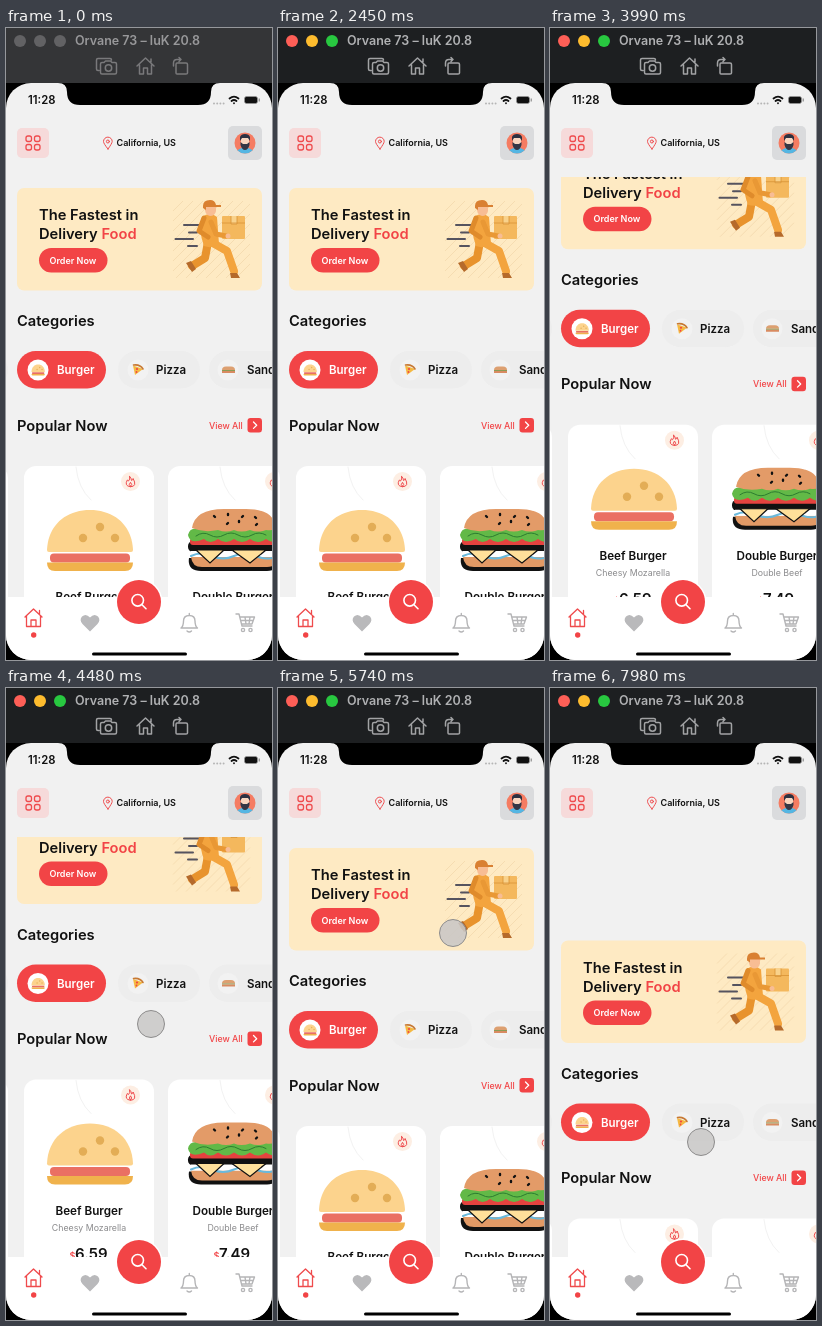
An HTML page that plays this animation: 266x632 px, repeating every 8 s.

```html
<!DOCTYPE html>
<html lang="en">
<head>
<meta charset="utf-8">
<title>Food delivery app</title>
<style>
  html, body { margin: 0; width: 100%; height: 100%; overflow: hidden; background: #000; }
  svg { display: block; width: 100%; height: 100%; }
  text { font-family: Inter, Roboto, sans-serif; font-weight: 600; fill: #111; }
  .head { font-size: 14.7px; }
  .chip { font-size: 11.5px; }
  .small { font-size: 9px; }
  .name { font-size: 11.7px; text-anchor: middle; }
  .sub { font-size: 8.8px; font-weight: 400; fill: #8b8b8d; text-anchor: middle; }
  .price { font-size: 15px; }
  .red { fill: #f24446; }
  .white { fill: #fff; }
  .line { fill: none; stroke-linecap: round; stroke-linejoin: round; }
  .redLine { stroke: #ef4b4d; }
  .greyLine { stroke: #b5b5b7; stroke-width: 1.4; }
</style>
</head>
<body>
<svg viewBox="0 0 266 632" preserveAspectRatio="none">
  <defs>
    <clipPath id="screen"><rect y="55" width="266" height="577" rx="25"/></clipPath>
    <clipPath id="viewport"><rect y="149" width="266" height="421"/></clipPath>
    <clipPath id="face"><circle cx="239" cy="115" r="10.5"/></clipPath>
    <g id="burger">
      <path d="M0 40C1 15 19 0 43 0S85 15 86 40Q86 42 84 42H2Q0 42 0 40Z" fill="#fcd38d"/>
      <g fill="#e3ad56"><circle cx="53" cy="17" r="4.2"/><circle cx="36" cy="28" r="4.2"/><circle cx="68" cy="28" r="4.2"/></g>
      <rect x="3" y="43.500" width="80" height="9" rx="4" fill="#ea7063"/>
      <path d="M0 52.500H86Q86 61 78 61H8Q0 61 0 52.500Z" fill="#f0b24c"/>
    </g>
    <g id="flame">
      <circle r="9.500" fill="#fdeee3"/>
      <path class="line redLine" d="M-.8 -5Q1 -3.500 1 -1Q2.500 -1.500 2.600 -3Q7 5 0 5.200Q-6.500 4.500 -3.200 -1.500L-2 -.5Q-.2 -2-.8 -5ZM0 5Q-2.500 3 0 .8Q2.500 3 0 5Z"/>
    </g>
  </defs>

  <g id="bar">
    <rect id="barFill" width="266" height="55"/>
    <g id="lights"><circle cx="14" cy="13" r="6"/><circle cx="34" cy="13" r="6"/><circle cx="54" cy="13" r="6"/></g>
    <text id="title" x="69" y="17.300" font-size="12.500">Orvane 73 – luK 20.8</text>
    <g id="tools" class="line" stroke-width="1.500">
      <path d="M93 42.500H92Q90.500 42.500 90.500 41V32Q90.500 30.500 92 30.500H104Q105.500 30.500 105.500 32M96 34.500H98L99.500 33H104.500L106 34.500H109Q110.500 34.500 110.500 36V44.500Q110.500 46 109 46H96Q94.500 46 94.500 44.500V36Q94.500 34.500 96 34.500Z"/>
      <circle cx="102.500" cy="40" r="3.200"/>
      <path d="M131 38L139.500 30L148 38M133.500 36.500V46H137.500V40H141.500V46H145.500V36.500M145 34V31"/>
      <path d="M171 35H180Q181.500 35 181.500 36.500V45Q181.500 46 180 46H171Q170 46 170 45V36.500Q170 35 171 35ZM167.500 38V35Q167.500 31.500 171 31.500H175M173 29.500L175 31.500L173 33.500"/>
    </g>
  </g>

  <g clip-path="url(#screen)">
    <rect y="55" width="266" height="577" fill="#f1f1f1"/>

    <g clip-path="url(#viewport)"><g id="content">
      <rect x="11" y="160" width="245" height="102.500" rx="7" fill="#feeac3"/>
      <g id="stripes" stroke="#f3d9ad" stroke-width=".8"></g>
      <text class="head" x="33" y="192">The Fastest in</text>
      <text class="head" x="33" y="211">Delivery <tspan class="red">Food</tspan></text>
      <rect class="red" x="33" y="220" width="68.500" height="24.500" rx="12.200"/>
      <text class="small white" x="43.500" y="235.600">Order Now</text>

      <g id="courier">
        <path class="line" stroke="#55535f" stroke-width="2" d="M178 197H193M183 204.500H191M169.500 211H187M182 218H191"/>
        <path class="line" stroke="#e8932d" stroke-width="8" d="M202 214L199 230L186 238"/>
        <path class="line" stroke="#f3a43e" stroke-width="8" d="M205 214L221 223L228 243"/>
        <path d="M180 235L185 233L190 241L186 244ZM224 245H231L234 250H225Z" fill="#b56a2b"/>
        <path d="M196 189Q204 183 211 189L213 216Q206 221 198 218Q192 202 196 189Z" fill="#f3a43e"/>
        <path d="M198 190L193 203L202 209" class="line" stroke="#df8b2b" stroke-width="5"/>
        <path d="M199 178H210V183Q209 188 204 188Q198 187 199 178Z" fill="#f8bd94"/>
        <path d="M197 180V178Q197 172 204 172Q209 172 210 177H215V179H200V182Z" fill="#d98032"/>
        <rect x="216" y="188" width="23" height="23" rx="1" fill="#f4b85d"/>
        <path d="M216 195H239M225 188V196H231V188" fill="#f9d28b" stroke="#d89435" stroke-width=".8"/>
        <path class="line" stroke="#e99835" stroke-width="5" d="M205 194L210 206L220 208"/>
        <circle cx="222" cy="208" r="2.500" fill="#f8bd94"/>
      </g>

      <text class="head" x="11" y="298.300">Categories</text>
      <g fill="#ededed"><rect x="112" y="323" width="82" height="37.500" rx="18.700"/><rect x="203" y="323" width="110" height="37.500" rx="18.700"/><rect x="-40" y="323" width="42" height="37.500" rx="18.700"/></g>
      <rect class="red" x="11" y="323" width="89" height="37.500" rx="18.700"/>
      <circle class="white" cx="32" cy="342" r="10.500"/>
      <use href="#burger" transform="translate(25.500 336.500) scale(.155 .18)"/>
      <g fill="#f2f2f2"><circle cx="132" cy="342" r="10.500"/><circle cx="222" cy="342" r="10.500"/></g>
      <path d="M127 337.500L137 341L129 347Z" fill="#f5b942"/>
      <path class="line" stroke="#c77933" stroke-width="1.600" d="M127.500 337Q134 336 137 341"/>
      <circle class="red" cx="131" cy="341" r="1.100"/><circle class="red" cx="130.500" cy="344" r=".9"/>
      <path d="M216 342Q216 338.500 220 338.500H225Q229 338.500 229 342Z" fill="#dda071"/>
      <path d="M216 342.500H229" stroke="#8a9b55"/><path d="M216 343H229V345H216Z" fill="#d98b61"/>
      <text class="chip white" x="51" y="346.200">Burger</text>
      <text class="chip" x="150" y="346.200">Pizza</text>
      <text class="chip" x="241" y="346.200">Sandwich</text>

      <text class="head" x="11" y="402.500">Popular Now</text>
      <text class="red" x="203" y="400.500" font-size="8.800" style="font-weight:500">View All</text>
      <rect class="red" x="241.500" y="390" width="14.500" height="14.500" rx="3"/>
      <path class="line" stroke="#fff" stroke-width="1.300" d="M247.500 394L250.700 397.200L247.500 400.400"/>

      <g class="white"><rect x="-128" y="438" width="130" height="200" rx="12"/><rect x="18" y="438" width="130" height="200" rx="12"/><rect x="162" y="438" width="130" height="200" rx="12"/></g>
      <path class="line" stroke="#f2f2f2" d="M70 439Q72 460 85 472M214 439Q216 460 229 472"/>
      <use href="#flame" x="124.500" y="453.500"/>
      <use href="#flame" x="268.500" y="453.500"/>
      <use href="#burger" x="41" y="482"/>

      <g id="doubleBurger">
        <path d="M183 530H272Q274 543 261 543H195Q181 543 183 530Z" fill="#111"/>
        <path d="M185 529H272Q272 539 261 539H196Q186 539 185 529Z" fill="#e29a66"/>
        <rect x="182" y="513" width="92" height="11" rx="5" fill="#111"/>
        <path d="M185 523H272V529H185Z" fill="#fff"/>
        <path d="M185 528Q195 523 206 528T228 528T250 528T272 528" class="line" stroke="#69b9dc" stroke-width="2"/>
        <path d="M190 522H218L204 535ZM226 522H260L244 535Z" fill="#ffe09a" stroke="#111" stroke-width="1.200"/>
        <rect x="184" y="510" width="90" height="7" rx="3" fill="#e5433f"/>
        <path d="M182 507Q184 499 193 501H274V512Q267 516 260 511Q252 517 244 511Q236 517 228 511Q220 517 212 511Q204 517 198 511Q184 517 182 507Z" fill="#62b947"/>
        <path class="line" stroke="#2d7d30" d="M190 508Q197 503 204 507T218 507T232 507T246 507T260 507"/>
        <path d="M186 500Q189 481 218 481H240Q268 481 270 500Q268 503 260 502Q252 505 244 502Q235 505 228 502Q220 505 212 502Q198 505 186 500Z" fill="#e39b68"/>
        <path class="line" stroke="#111" stroke-width="2.400" d="M208 488L209 489M222 486V487M237 488L236 489M221 496L222 495M233 493V494M249 489L250 490M250 497L251 496"/>
      </g>

      <text class="name" x="83" y="573.300">Beef Burger</text>
      <text class="name" x="227" y="573.300">Double Burger</text>
      <text class="sub" x="83" y="589.300">Cheesy Mozarella</text>
      <text class="sub" x="227" y="589.300">Double Beef</text>
      <text class="price" x="69" y="617">6.59</text><text class="small red" x="63.500" y="617">$</text>
      <text class="price" x="213" y="617">7.49</text><text class="small red" x="207.500" y="617">$</text>
    </g></g>

    <path d="M52 54V55Q61 55 61 64Q61 77 74 77H192Q205 77 205 64Q205 55 214 55V54Z"/>
    <text x="22" y="76" font-size="11.300">11:28</text>
    <path class="line" stroke="#b5b5b5" stroke-width="2" stroke-dasharray="0 3.200" d="M208 75.500H218"/>
    <path class="line" stroke="#111" stroke-width="1.800" d="M223.500 70.500Q228 66.800 232.500 70.500M225.500 73Q228 71 230.500 73M228 75.200V75.300"/>
    <rect x="238.500" y="68.500" width="13" height="7" rx="2" fill="#111" stroke="#999" stroke-width=".7"/>
    <path d="M253.200 70.500V73.500" stroke="#777"/>

    <rect x="11" y="100" width="32" height="30" rx="5" fill="#f6dada"/>
    <g class="line redLine" stroke-width="1.300"><rect x="20" y="108" width="5.500" height="5.500" rx="2"/><rect x="28.500" y="108" width="5.500" height="5.500" rx="2"/><rect x="20" y="116.500" width="5.500" height="5.500" rx="2"/><rect x="28.500" y="116.500" width="5.500" height="5.500" rx="2"/></g>
    <path class="line redLine" d="M102 121Q97.500 115.500 97.500 113.500A4.300 4.300 0 0 1 106.200 113.500Q106 115.500 102 121Z"/>
    <circle class="line redLine" cx="101.900" cy="113.500" r="1.500"/>
    <text class="small" x="110.500" y="118.300">California, US</text>
    <rect x="222" y="98" width="34" height="34" rx="5" fill="#dadbdd"/>
    <g clip-path="url(#face)">
      <rect x="228" y="104" width="22" height="22" fill="#f57c62"/>
      <path d="M229 127Q231 119.500 239 119.500T249 127Z" fill="#54b6e3"/>
      <rect x="235" y="108" width="8" height="11" rx="3.500" fill="#f8d6c0"/>
      <path d="M234 113V109Q235 106 239 106T244 109V113L242 110H236Z" fill="#2d3141"/>
      <path d="M234.500 114L237 116H241L243.500 114V117Q242 122 239 122T234.500 117Z" fill="#343746"/>
    </g>

    <rect class="white" y="569" width="266" height="63"/>
    <circle class="white" cx="133" cy="574" r="23.500"/>
    <circle class="red" cx="133" cy="574" r="22"/>
    <g class="line" stroke="#fff" stroke-width="1.600"><circle cx="131.700" cy="572.300" r="5.800"/><path d="M136 576.700L140 580.700"/></g>
    <path class="line redLine" stroke-width="1.300" d="M19 589L27.500 581L36 589M20.500 588V598.500H34.500V588M25 598V592H30V598M33.500 586V582.500"/>
    <circle class="red" cx="27.700" cy="607" r="2.700"/>
    <path d="M84 603.500L76.500 596Q73 592 76 588.500Q80 585 84 589.500Q88 585 92 588.500Q95 592 91.500 596Z" fill="#b9b9bb"/>
    <path class="line greyLine" d="M175 600H191.500Q189 598 189 593Q189 587.500 183.300 587.500T177.500 593Q177.500 598 175 600ZM183.300 587V585.500M181 603Q183.300 605 185.500 603"/>
    <path class="line greyLine" d="M230 586H233L236 598H246M234 589H248.500L246 596H235.500M235 592.500H247M239 589L240 596M244 589L243 596"/>
    <g class="line greyLine"><circle cx="237" cy="602" r="1.600"/><circle cx="244.500" cy="602" r="1.600"/></g>
    <rect x="86" y="624.500" width="95" height="3" rx="1.500"/>
    <circle id="touch" r="13.500" fill="#cac8c7" fill-opacity=".88" stroke="#8d8c8c"/>
  </g>
</svg>

<script>
  const LOOP = 8000, FOCUS_AT = 420;
  const $ = id => document.getElementById(id);

  // Keys are [time, value, ...]; values ease between neighbouring keys.
  const scroll = [
    [0, 0], [2900, 0], [3430, -21.5], [3800, -40], [4480, -46.5], [4650, -46.5], [5150, 0],
    [6200, 0], [6580, -31], [6700, -31], [6790, -34], [7000, -34], [7280, -30], [7980, 92.5], [8000, 93]
  ];
  const touches = [
    [[2750, 118, 257], [2900, 118, 257], [3430, 120, 236], [3800, 121, 218]],
    [[4050, 144, 341], [4480, 145, 336], [4650, 145, 336]],
    [[5450, 175, 245], [5900, 175, 245]],
    [[6100, 72, 231], [6200, 72, 231], [6580, 70, 200], [6700, 70, 200], [6790, 69, 197],
     [7000, 69, 197], [7280, 72, 201], [7980, 151, 454], [8000, 152, 456]]
  ];

  function sample(keys, time) {
    const next = keys.findIndex(key => key[0] > time);
    if (next < 1) return keys[next < 0 ? keys.length - 1 : 0].slice(1);
    const a = keys[next - 1], b = keys[next];
    const u = (time - a[0]) / (b[0] - a[0]), eased = u * u * (3 - 2 * u);
    return a.slice(1).map((v, i) => v + (b[i + 1] - v) * eased);
  }

  function drawStripes() {
    let lines = '';
    for (let sum = 350; sum <= 480; sum += 10) {
      const x1 = Math.max(167, sum - 250), x2 = Math.min(244, sum - 173);
      const y1 = sum - x1, y2 = sum - x2;
      if (x2 > x1) lines += `<path d="M${x1} ${y1}L${x2} ${y2}"/>`;
    }
    $('stripes').innerHTML = lines;
  }

  function setFocus(focused) {
    const colors = focused ? ['#fe5f57', '#febc2e', '#28c840'] : ['#626264', '#626264', '#626264'];
    [...$('lights').children].forEach((light, i) => light.setAttribute('fill', colors[i]));
    $('barFill').setAttribute('fill', focused ? '#1d1f21' : '#343537');
    $('title').style.fill = focused ? '#b0b1b3' : '#98989a';
    $('tools').setAttribute('stroke', focused ? '#a2a3a5' : '#79797b');
  }

  function render(time) {
    setFocus(time >= FOCUS_AT);
    $('content').setAttribute('transform', `translate(0 ${sample(scroll, time)[0]})`);
    const active = touches.find(keys => time >= keys[0][0] && time <= keys[keys.length - 1][0]);
    $('touch').style.display = active ? '' : 'none';
    if (active) $('touch').setAttribute('transform', `translate(${sample(active, time).join(' ')})`);
  }

  function tick() {
    render(performance.now() % LOOP);
    requestAnimationFrame(tick);
  }

  drawStripes();
  tick();
</script>
</body>
</html>
```
